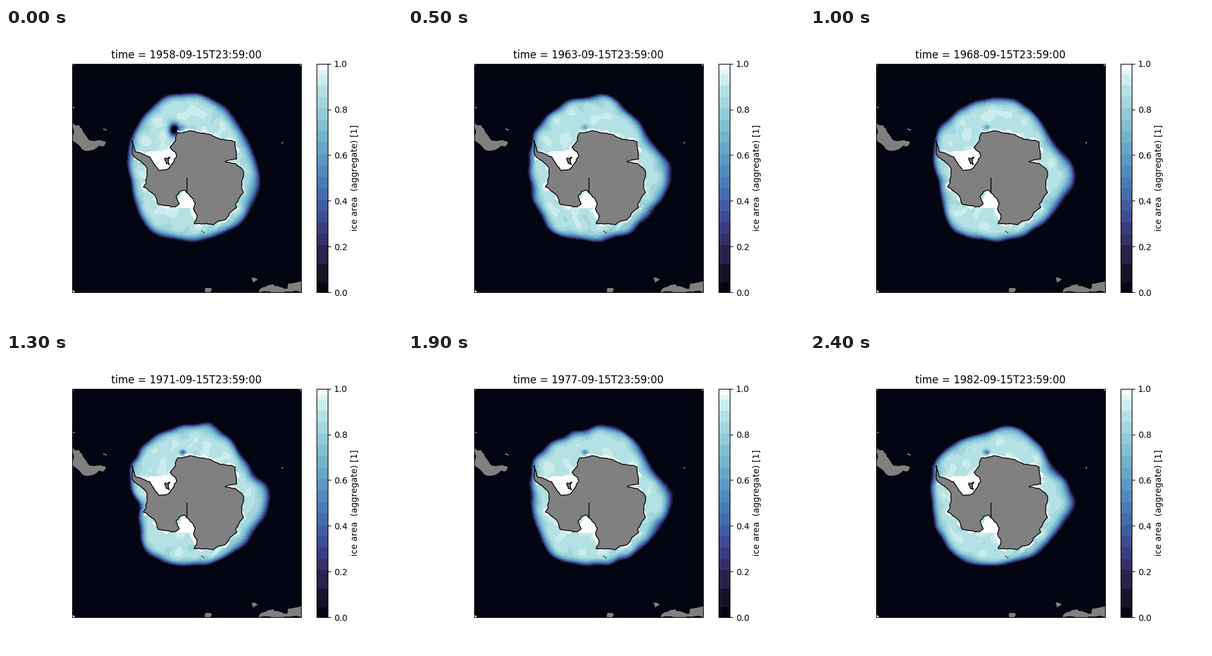
Write a matplotlib script that moves like this. It is 640 px wide and 480 px high and loops after 2500 ms.

```python
import numpy as np
import matplotlib.pyplot as plt
from matplotlib.animation import FuncAnimation
from matplotlib.colors import BoundaryNorm, LinearSegmentedColormap, ListedColormap
from matplotlib.path import Path

plt.rcParams["font.family"] = "DejaVu Sans"
plt.rcParams["text.kerning_factor"] = 6
FRAMES, FIRST_YEAR = 25, 1958
L, R, T, B = 107.2, 476.8, 57.6, 427.2   # map box in stage pixels
CX, CY, N = 292, 242, 185
rng = np.random.default_rng(7)

# Banded colour scale, dark sea to white ice
EDGES = np.r_[0, .045, .125, np.linspace(.205, .905, 15), .95, .972, 1]
RAMP = [(0, "#030512"), (.03, "#030512"), (.085, "#141428"), (.24, "#38326e"),
        (.34, "#3e4f9c"), (.5, "#4a82b9"), (.7, "#76b9ce"), (.88, "#b4e1e3"),
        (.96, "#dcf5f5"), (.985, "#fdfcff"), (1, "#ffffff")]
mids = (EDGES[1:] + EDGES[:-1]) / 2
cmap = ListedColormap(LinearSegmentedColormap.from_list("ice", RAMP, 1024)(mids))
norm = BoundaryNorm(EDGES, len(mids))

# Mean ice edge: bearing clockwise from the top, radius
MEAN_EDGE = [(0, 127), (12, 135), (36, 126), (56, 117), (66, 119), (83, 134), (92, 133),
             (108, 123), (144, 111), (180, 103), (216, 107), (240, 93), (268, 88),
             (306, 113), (340, 123)]

COAST = [(204, 182), (209, 200), (232, 208), (247, 230), (263, 227), (276, 207),
         (265, 193), (274, 182), (278, 169), (299, 166), (321, 170), (346, 180),
         (370, 184), (373, 212), (354, 216), (371, 219), (384, 232), (384, 266),
         (372, 283), (373, 290), (354, 310), (335, 318), (304, 316), (309, 303),
         (303, 293), (306, 283), (289, 262), (275, 272), (280, 284), (274, 289),
         (246, 285), (235, 266), (222, 257), (228, 227), (208, 209)]
AMERICA = [(107, 153), (119, 157), (135, 181), (162, 184), (160, 190), (143, 197), (107, 182)]
AUSTRALIA = [(408, 428), (412, 420), (432, 413), (454, 421), (456, 412), (478, 409), (478, 428)]
TASMANIA = [(396, 403), (402, 403), (409, 407), (399, 413)]
ZEALAND = [(321, 428), (323, 419), (333, 421), (330, 428)]
ISLAND = [(257, 210), (265, 209), (264, 221), (259, 219)]
WEDDELL = [(224, 201), (268, 197), (277, 207), (269, 224), (247, 232)]
ROSS = [(271, 290), (289, 260), (304, 273), (309, 304), (303, 306), (296, 292)]


def rough(pts, amp=.07, rounds=3):
    """Closed outline made ragged by moving midpoints sideways."""
    p = np.array(pts, float)
    for _ in range(rounds):
        side = np.roll(p, -1, 0) - p
        shift = rng.normal(0, amp, (len(p), 1)) * side[:, ::-1] * [1, -1]
        p = np.stack([p, p + side / 2 + shift], 1).reshape(-1, 2)
    return p


def waves(count, lo, hi):
    """Smooth random field with values around zero."""
    out = np.zeros_like(gx)
    for _ in range(count):
        a, ph = rng.uniform(0, 2 * np.pi, 2)
        k = 2 * np.pi / rng.uniform(lo, hi)
        out += np.cos(k * (gx * np.cos(a) + gy * np.sin(a)) + ph)
    return out / np.sqrt(count)


def blob(x, y, w, h):
    return np.exp(-((gx - x) / w) ** 2 - ((gy - y) / h) ** 2)


def lobe(centre, width):
    off = (angle - centre + 180) % 360 - 180
    return np.exp(-(off / width) ** 2)


def inside(pts):
    return Path(pts).contains_points(np.c_[gx.ravel(), gy.ravel()]).reshape(gx.shape)


cell = (R - L) / N
gx, gy = np.meshgrid(L + cell * (np.arange(N) + .5), T + cell * (np.arange(N) + .5))
dist = np.hypot(gx - CX, gy - CY)
angle = np.degrees(np.arctan2(gx - CX, CY - gy)) % 360

bearings, radii = np.transpose(MEAN_EDGE)
mean_edge = sum(np.interp(angle + d, bearings, radii, period=360) for d in (-4, 0, 4)) / 3

coast = rough(COAST)
to_coast = np.full_like(gx, 1e3)
for px, py in coast:
    to_coast = np.minimum(to_coast, np.hypot(gx - px, gy - py))

texture = waves(10, 18, 60)
fringe = to_coast < 1.5 + 2.5 * waves(8, 8, 25)
shelf = inside(WEDDELL) | inside(ROSS)
streaks = blob(350, 318, 28, 14) * np.cos((gx + gy) / 2.6)


def ice(step):
    edge = (mean_edge
            + (12 - step) * lobe(350, 25)
            + (5 - 18 * np.exp(-step / 2)) * lobe(88, 18)
            + 9 * np.sin(2 * np.pi * (step + 1) / 19) * lobe(262, 26)
            + 1.5 * waves(6, 30, 70))
    depth = np.clip(edge - dist, 0, None)
    top = .895 + .02 * texture + .02 * waves(8, 25, 60) - .05 * streaks
    v = top * (1 - np.exp(-(depth / (7 + 4 * lobe(95, 35))) ** 1.3))
    v -= 1.1 * np.exp(-step / 1.5) * blob(272, 165, 8, 10)
    v -= rng.uniform(.2, .6) * blob(286, 161, 5, 4)
    v = np.clip(v, 0, .965)
    v[(fringe & (depth > 12)) | shelf] = 1
    return v


fields = [ice(i) for i in range(FRAMES)]

fig = plt.figure(figsize=(6.4, 4.8), dpi=100, facecolor="white")
ax = fig.add_axes([L / 640, .11, (R - L) / 640, .77])
im = ax.imshow(fields[0], cmap=cmap, norm=norm, extent=(L, R, B, T),
               interpolation="nearest", aspect="auto")
ax.set(xlim=(L, R), ylim=(B, T), xticks=[], yticks=[])
title = ax.set_title("", fontsize=12)


def land(pts, lw=.8):
    ax.fill(*np.transpose(pts), fc="#808080", ec="black", lw=lw, joinstyle="round")


def dots(pts, color):
    ax.plot(*np.transpose(pts), "s", color=color, ms=1.2, mew=0)


land(coast, 1)
land(rough(ISLAND, .12), 1)
for pts in (AMERICA, AUSTRALIA, TASMANIA, ZEALAND):
    land(rough(pts))

ax.plot([CX, CX], [CY, 265], color="black", lw=1)
ax.plot([278, 300], [290.5, 290.5], color="#b4e1e3", lw=.7)
dots([(315.5, 327.5), (318.5, 329.5)], "black")
dots([(158, 162.5), (160.5, 163.5), (445.5, 184.5), (108.5, 128)], "white")
for x, y, dx, dy in [(L, T, 4, 4), (R, T, -4, 4), (L, B, 5, -5)]:
    ax.fill([x, x + dx, x], [y, y, y + dy], color="white", lw=0)

cax = fig.add_axes([501.6 / 640, .11, 18.48 / 640, .77])
cax.pcolormesh([0, 1], EDGES, mids[:, None], cmap=cmap, norm=norm)
cax.set(xticks=[], ylim=(0, 1), yticks=np.linspace(0, 1, 6))
cax.yaxis.tick_right()
cax.yaxis.set_label_position("right")
cax.yaxis.set_major_formatter("{x:.1f}")
cax.set_ylabel("ice area  (aggregate) [1]")


def update(i):
    im.set_data(fields[i])
    title.set_text(f"time = {FIRST_YEAR + i}-09-15T23:59:00")
    return im, title


anim = FuncAnimation(fig, update, frames=FRAMES, interval=100, repeat=True, repeat_delay=0)
plt.show()
```
